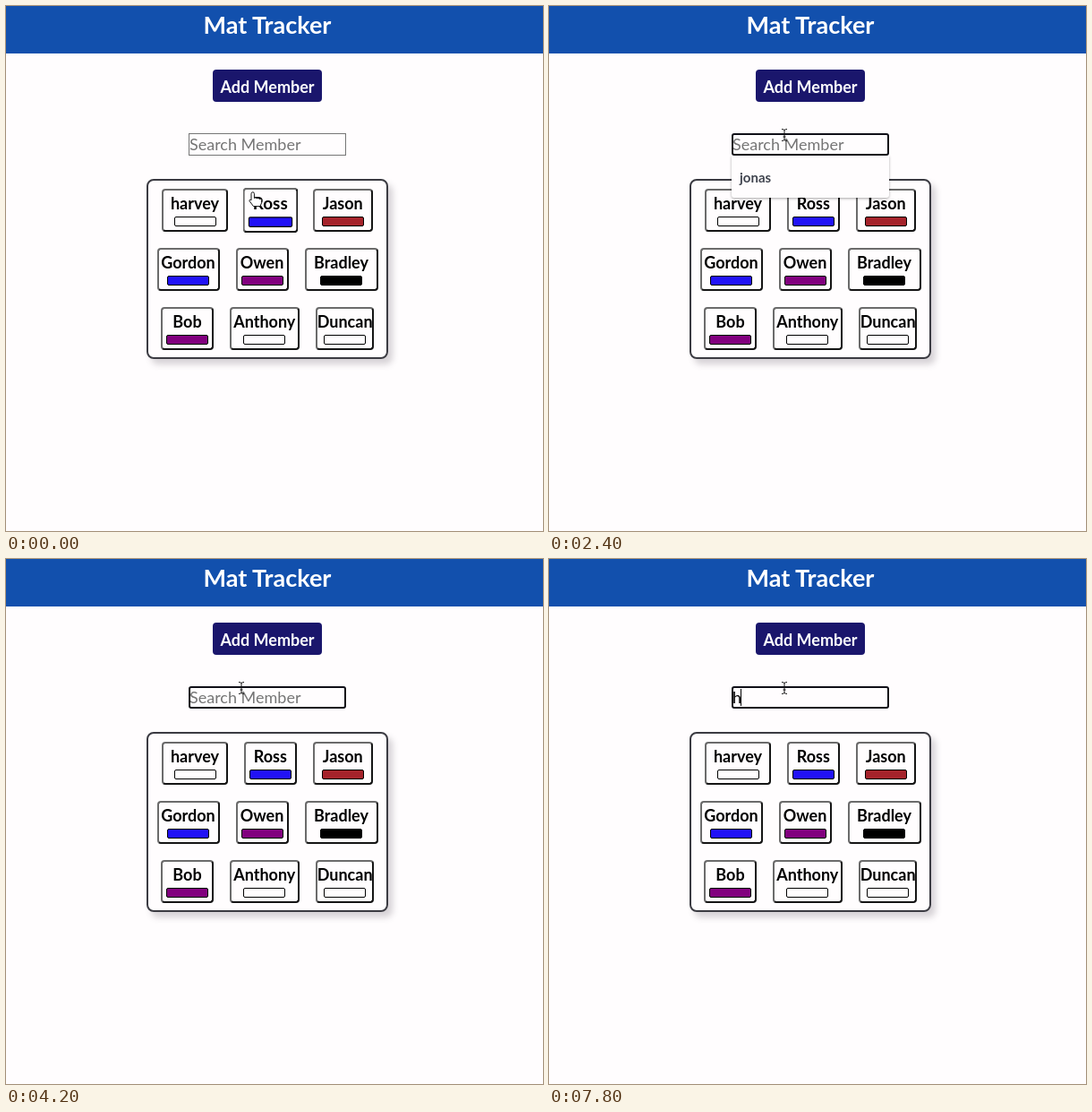
An HTML page for the animation above (8 s loop, 600 px wide and 586 px high).

```html
<!DOCTYPE html>
<html lang="en">
<head>
<meta charset="utf-8">
<title>Mat Tracker</title>
<style>
* { box-sizing: border-box; }
html, body { margin: 0; width: 100%; height: 100%; overflow: hidden; background: #fffdfe; }
body { position: relative; font: 18px/22px Lato, "Open Sans", sans-serif; }
header, #add, #search, #panel, #hint, #caret, #mouse { position: absolute; }
header { left: 0; top: 0; width: 100%; height: 53px; background: #1250ad; }
h1 { position: absolute; left: 92px; top: 4px; width: 400px; margin: 0; color: #fff;
  font-size: 27px; line-height: 33px; text-align: center; }
#add { left: 231px; top: 71px; width: 122px; height: 36px; padding-top: 8px; border-radius: 4px;
  background: #1a166c; color: #fff; font-weight: 700; text-align: center; }
#search { left: 204px; top: 142px; width: 176px; height: 25px; padding: 0 0 0 1px;
  line-height: 25px; white-space: pre; box-shadow: inset 0 0 0 1px #767676; background: #fffdfe; }
#search.focus { border-radius: 3px; box-shadow: inset 0 0 0 2px #101018; }
#caret { top: 145px; width: 1px; height: 19px; background: #000; }
#panel { left: 157px; top: 193px; width: 270px; padding: 9px 0 8px; border: 2px solid #3b3b42;
  border-radius: 8px; box-shadow: 5px 6px 7px rgba(70, 60, 75, .22);
  display: flex; flex-wrap: wrap; justify-content: center; gap: 18px; }
.card { height: 48px; padding-top: 3px; border: 2px solid; border-color: #6b6b6b #151515 #151515 #6b6b6b;
  border-radius: 4px; font-weight: 700; text-align: center; white-space: nowrap; }
.card i { display: block; width: 47px; height: 11px; margin: 4px auto 0;
  border: 1px solid #000; border-radius: 2px; }
#hint { left: 204px; top: 167px; width: 176px; height: 47px; padding: 13px 0 0 9px;
  border-radius: 0 0 3px 3px; background: #fffdfe; box-shadow: 0 1px 3px rgba(0, 0, 0, .35);
  color: #40444f; font-size: 15px; font-weight: 700; }
#mouse { left: 0; top: 0; overflow: visible; fill: #fff; stroke: #111; stroke-linejoin: round; }
</style>
</head>
<body>
<header><h1>Mat Tracker</h1></header>
<div id="add">Add Member</div>
<div id="search"></div>
<div id="caret"></div>
<div id="panel"></div>
<div id="hint">jonas</div>
<svg id="mouse" width="1" height="1"><path id="shape"/></svg>
<script>
const LOOP = 8000, STEP = 200;
const $ = id => document.getElementById(id);

const belts = { white: '#fffdfe', blue: '#2112f6', brown: '#a5232b', purple: '#81007e', black: '#000' };
const members = [
  ['harvey', 74, 'white'], ['Ross', 58.5, 'blue'], ['Jason', 67.5, 'brown'],
  ['Gordon', 70, 'blue'], ['Owen', 59, 'purple'], ['Bradley', 82, 'black'],
  ['Bob', 58.5, 'purple'], ['Anthony', 78, 'white'], ['Duncan', 65, 'white']
];
const cards = members.map(([name, width, belt]) => {
  const card = document.createElement('div'), bar = document.createElement('i');
  card.className = 'card';
  card.style.width = width + 'px';
  bar.style.background = belts[belt];
  card.append(name, bar);
  $('panel').append(card);
  return card;
});

const shapes = {
  hand: 'M-2 2a1.7 1.7 0 0 1 3.4 0v5q1.5-1.4 3 .3q1.5-1 2.8.6q2-.6 2.4 1.2v3l-1.6 4h-7.5l-4.5-6q-.3-2 1.6-1.2l.4.4z',
  arrow: 'M0 0v14l3.3-3 2.3 5 2-1-2.2-4.8h4.4z',
  beam: 'M-3-6.5q2 0 3 1q1-1 3-1M0-5.5v11M-3 6.5q2 0 3-1q1 1 3 1M-1.5 2h3'
};

const within = (t, spans) => spans.some(([from, to]) => t >= from && t < to);
const typed = t => within(t, [[2600, 4000]]) ? 'b'
  : within(t, [[4800, 6400]]) ? 'j'
  : t >= 7800 ? 'h' : '';
const caretX = { '': 205, b: 215, j: 212, h: 214 };
const caretOn = [[800, 1400], [1600, 2200], [2600, 3200], [3800, 5400], [6000, 7200], [7800, LOOP]];
const hintOn = [[1400, 2800], [4800, 6600]];
const hintFade = [[2600, 2800], [6400, 6600]];

function drawMouse(t) {
  const p = Math.min(t / 800, 1), ease = p * p * (3 - 2 * p);
  const x = t < 1600 ? 276 - 11 * ease : 263;
  const y = 207.5 - 63.5 * ease;
  const kind = y > 204 ? 'hand' : y > 167 ? 'arrow' : 'beam';
  $('shape').setAttribute('d', shapes[kind]);
  $('shape').style.fill = kind === 'beam' ? 'none' : '';
  $('mouse').style.transform = `translate(${x}px, ${y}px)`;
  cards[1].style.transform = kind === 'hand' ? 'scale(1.05)' : '';
}

function draw(t) {
  const text = typed(t), query = typed(t - STEP); // the list follows one step after the key
  $('search').textContent = text || 'Search Member';
  $('search').style.color = text ? '#000' : '#757575';
  $('search').classList.toggle('focus', t >= 800);
  $('caret').style.left = caretX[text] + 'px';
  $('caret').hidden = !within(t, caretOn);
  cards.forEach((card, i) => {
    card.style.display = members[i][0].toLowerCase().startsWith(query) ? '' : 'none';
  });
  const fading = within(t, hintFade);
  $('hint').hidden = !within(t, hintOn);
  $('hint').style.opacity = fading ? .84 : 1;
  $('hint').style.transform = fading ? 'scale(.99)' : '';
  drawMouse(t);
}

const start = performance.now();
function tick() {
  const t = (performance.now() - start) % LOOP;
  draw(Math.floor(t / STEP) * STEP);
  requestAnimationFrame(tick);
}
tick();
</script>
</body>
</html>
```
